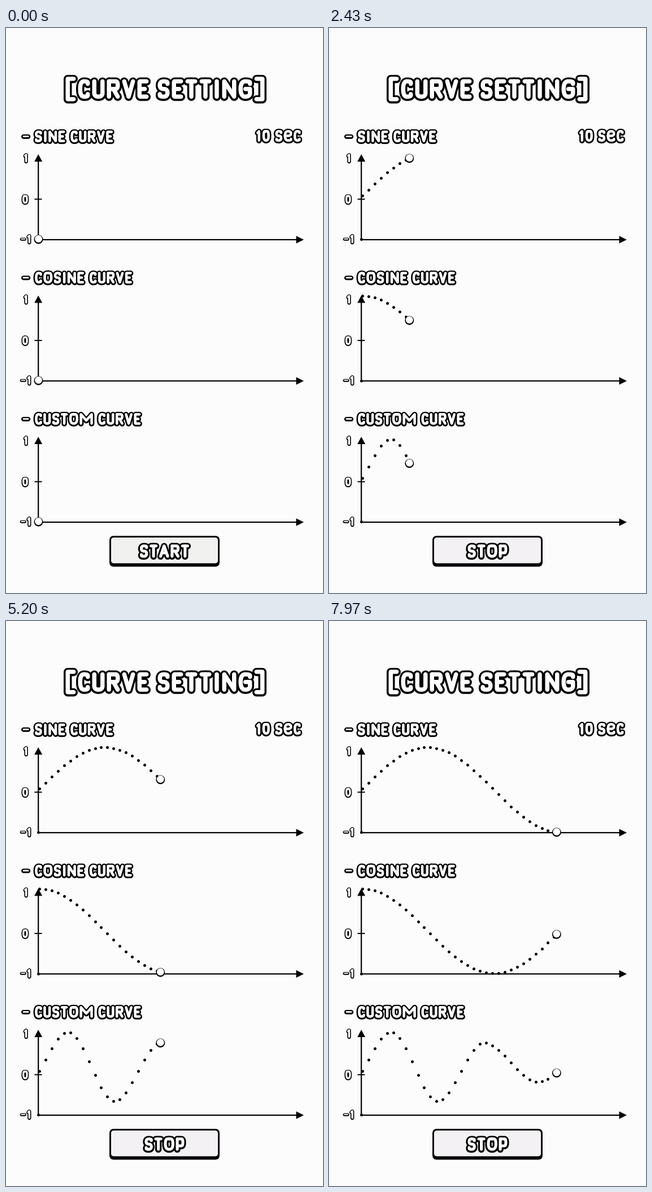
Recreate the animation shown at these times as a matplotlib script. Size 561 px wide and 998 px high, loop 8000 ms.

```python
import numpy as np
import matplotlib.pyplot as plt
from matplotlib.animation import FuncAnimation
from matplotlib.collections import LineCollection
from matplotlib.patches import Circle, FancyBboxPatch, Polygon

W, H, DPI = 561, 998, 100
PX = 72 / DPI                     # points per pixel
FRAMES, LOOP = 240, 8000
PRESS, RUN = 16, 18               # frames: button goes down, curves start
T0, SPEED = 588, 0.0468           # ms, px per ms
X0, X_SPAN = 57.5, 468
GAP, AMP = 249.5, 75              # section pitch, wave height
BG = "#fcfcfd"

# Rounded lettering: advance width, then strokes as xy points on a 4 x 6 grid.
# A repeated point makes a hard corner.
GLYPHS = {
    "C": (25, "41 40 00 06 46 45"),
    "U": (26, "00 03 06 46 43 40"),
    "R": (27, "06 00", "00 20 40 43 23 03", "23 46"),
    "V": (27, "00 26 26 40"),
    "E": (24, "40 10 00 01 05 06 16 46", "03 33"),
    "S": (25, "41 40 00 03 43 46 06 05"),
    "T": (25, "00 40", "20 26"),
    "I": (15, "20 26"),
    "N": (29, "06 00 00 46 46 40"),
    "G": (28, "41 40 00 06 46 43 43 23"),
    "O": (31, "20 00 06 46 40 20"),
    "M": (43, "06 00 00 24 24 40 40 46"),
    "P": (26, "06 00", "00 20 40 44 24 04"),
    "A": (30, "06 20 20 46", "14 34"),
    "e": (29, "03 43 40 00 06 46 45"),
    "0": (26, "20 00 06 46 40 20"),
    "1": (20, "11 30 30 36"),
    "-": (25.5, "03 43"),
    "[": (22, "40 00 00 06 06 46"),
    "]": (22, "00 40 40 46 46 06"),
    " ": (12,),
}
CAP, STEM, SIDE = 27, 7.5, 5.75


def rounded(pts, passes=3):
    """Corner cutting that keeps both ends."""
    for _ in range(passes):
        a, b = pts[:-1], pts[1:]
        cut = np.stack([0.75 * a + 0.25 * b, 0.25 * a + 0.75 * b], 1)
        pts = np.vstack([pts[:1], cut.reshape(-1, 2), pts[-1:]])
    return pts


def text_width(text, size):
    return size * sum(GLYPHS[c][0] for c in text)


def lettering(text, x, y, size, edge):
    """Outlined text with its left at x and its middle at y."""
    lines, stems = [], []
    for c in text:
        adv, *strokes = GLYPHS[c]
        tall = 4 / 3 if c in "[]" else 1
        for s in strokes:
            p = np.array([[int(q[0]), int(q[1])] for q in s.split()], float)
            px = x + size * (SIDE + p[:, 0] / 4 * (adv - 2 * SIDE))
            py = y + size * CAP * tall * (p[:, 1] / 6 - 0.5)
            lines.append(rounded(np.column_stack([px, py])))
            stems.append(size * STEM * (0.6 if c == "-" else 1))
        x += size * adv
    stems = np.array(stems)
    parts = []
    for color, widths, drop in (("black", stems + 2 * edge, 0.4), ("white", stems, 0)):
        lc = LineCollection([l + [0, drop] for l in lines], colors=color,
                            linewidths=widths * PX, capstyle="round",
                            joinstyle="round", snap=False, zorder=3)
        parts.append(ax.add_collection(lc, autolim=False))
    return parts


def centered(text, x, y, size, edge):
    return lettering(text, x - text_width(text, size) / 2, y, size, edge)


def box(x0, y0, x1, y1, radius, color):
    style = f"round,pad=0,rounding_size={radius}"
    patch = FancyBboxPatch((x0, y0), x1 - x0, y1 - y0, boxstyle=style,
                           facecolor=color, edgecolor="none", zorder=2)
    return ax.add_patch(patch)


def axes_lines(dy):
    def line(xs, ys, width):
        ax.plot(xs, np.add(ys, dy), color="black", lw=width * PX,
                snap=False, zorder=1)

    def head(*pts):
        ax.add_patch(Polygon(np.add(pts, [0, dy]), color="black", lw=0, zorder=1))

    line([57.2, 57.2], [232, 374], 2.2)
    line([57, 516], [373.9, 373.9], 2.2)
    line([51.5, 62.5], [302.4, 302.4], 2)
    head((57.2, 223), (50.2, 236), (64.2, 236))
    head((527, 373.9), (513.5, 367.2), (513.5, 380.6))
    lettering("1", 30.3, 229.7 + dy, 0.44, 1.6)
    lettering("0", 28.2, 302.7 + dy, 0.44, 1.6)
    lettering("-1", 24.7, 372.7 + dy, 0.44, 1.6)


def sine(x):
    return 298 - AMP * np.sin(2 * np.pi * (x - X0) / X_SPAN)


def cosine(x):
    return 298 + GAP - AMP * np.cos(2 * np.pi * (x - X0) / X_SPAN)


KEY_X = np.array([X0, 109, 192.5, 274, 369, 464])
KEY_Y = np.array([797.5, 726, 848, 745, 814, 759])
KEY_SLOPE = np.array([-1.66, 0, 0, 0, 0, 0])


def custom(x):
    """Hermite curve through the keys."""
    x = np.asarray(x, float)
    i = np.clip(np.searchsorted(KEY_X, x, "right") - 1, 0, len(KEY_X) - 2)
    span = KEY_X[i + 1] - KEY_X[i]
    u = (x - KEY_X[i]) / span
    ease = u * u * (3 - 2 * u)
    bend = KEY_SLOPE[i] * span * u * (1 - u) ** 2
    return KEY_Y[i] + (KEY_Y[i + 1] - KEY_Y[i]) * ease + bend


CURVES = (sine, cosine, custom)
DOT_X = 59 + 10.95 * np.arange(43)

fig = plt.figure(figsize=(W / DPI, H / DPI), dpi=DPI, facecolor=BG)
ax = fig.add_axes([0, 0, 1, 1])
ax.set_xlim(0, W)
ax.set_ylim(H, 0)
ax.axis("off")
ax.set_autoscale_on(False)

lettering("[CURVE SETTING]", 103.5, 107.7, 1, 3.5)
lettering("10 SeC", 440.5, 190.5, 0.6, 2.6)
for k, title in enumerate(("SINE", "COSINE", "CUSTOM")):
    lettering(f"- {title} CURVE", 27.5, 191.5 + k * GAP, 0.6, 2.6)
    axes_lines(k * GAP)

base = box(183, 897, 378, 951.5, 8, "black")
face = box(186, 900, 375, 945.5, 5, "#f1f1f0")
start_label = centered("START", 280.5, 924, 0.68, 3.1)
stop_label = centered("STOP", 280.5, 924, 0.68, 3.1)
start_paths = [[p.vertices.copy() for p in lc.get_paths()] for lc in start_label]

trails, balls = [], []
for k in range(3):
    trail, = ax.plot([], [], "o", color="black", ms=5 * PX, mew=0,
                     snap=False, zorder=4)
    trails.append(trail)
    balls.append((ax.add_patch(Circle((0, 0), 7.9, color="black", lw=0, zorder=5)),
                  ax.add_patch(Circle((0, 0), 6.4, color="white", lw=0, zorder=6))))


def set_button(running, drop):
    base.set_y(897 + drop)
    face.set_y(900 + drop)
    face.set_facecolor("#f3f1f4" if running else "#f1f1f0")
    for lc, paths in zip(start_label, start_paths):
        lc.set_segments([p + [0, drop] for p in paths])
        lc.set_visible(not running)
    for lc in stop_label:
        lc.set_visible(running)


def draw(n):
    running = n >= RUN
    x = X0 + SPEED * max(0, n * LOOP / FRAMES - T0)
    set_button(running, 4 if PRESS <= n < RUN else 0)
    for k, (curve, trail, ball) in enumerate(zip(CURVES, trails, balls)):
        rest = 373 + k * GAP
        y = float(curve(x)) if running else rest
        black, white = ball
        black.set_center((x, y + 0.4))
        white.set_center((x, y - 0.5))
        if running:
            seen = DOT_X[DOT_X <= x]
            trail.set_data(np.r_[X0, seen], np.r_[rest, curve(seen)])
        else:
            trail.set_data([], [])
    return trails


anim = FuncAnimation(fig, draw, frames=FRAMES, interval=LOOP / FRAMES,
                     init_func=lambda: draw(0), repeat=True, repeat_delay=0)
plt.show()
```
